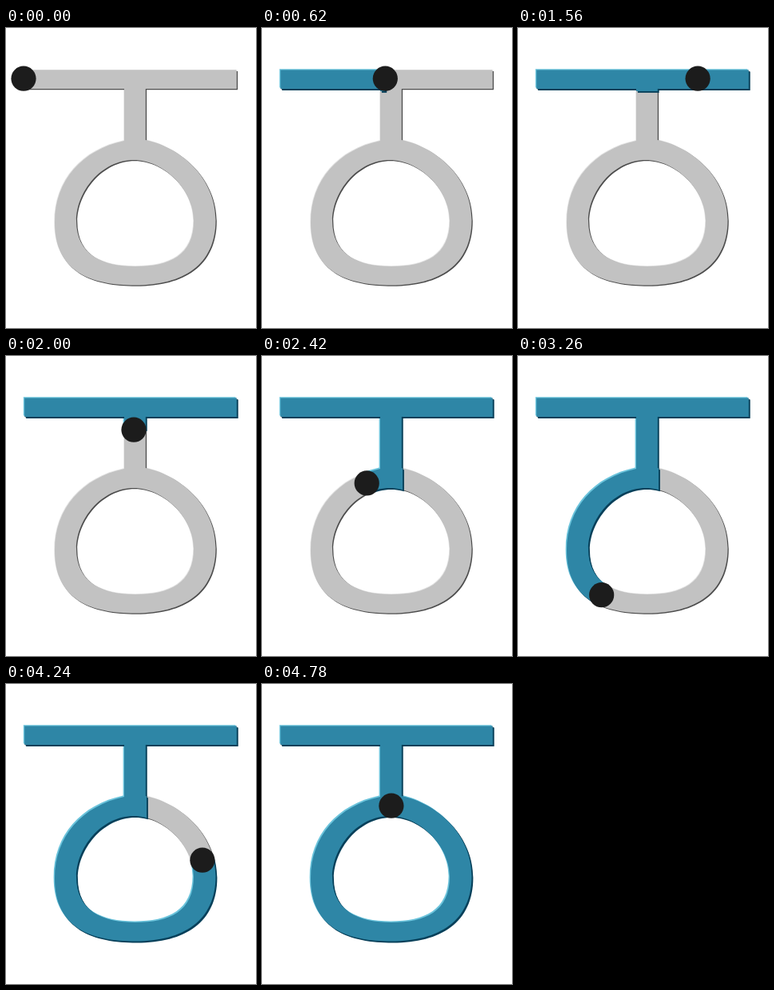
Write an HTML page that moves like this. It is 313 by 375 pixels and loops after 4.8 s.

```html
<!DOCTYPE html>
<html lang="en">
<head>
<meta charset="utf-8">
<title>Letter tracing</title>
<style>
  html, body { margin: 0; width: 100%; height: 100%; overflow: hidden; background: #fff; }
  svg { display: block; width: 100vw; height: 100vh; }
</style>
</head>
<body>
<svg viewBox="0 0 313 375">
  <defs>
    <path id="letter" fill-rule="evenodd" d="
      M23.2 52.6H288.8V76H174.8V140
      C222 150 262.5 190 262.5 240 C262.5 296 222 321.5 162 321.5
      C108 321.5 61 306 61 243 C61 190 96 152 148 141
      V76H23.2Z
      M160 165
      C119 165 88 205 88 241 C88 284 122 298 162 298
      C205 298 235 284 235 241 C235 203 198 165 160 165Z"/>
    <mask id="reveal" maskUnits="userSpaceOnUse" x="0" y="0" width="313" height="375">
      <g fill="#fff">
        <rect id="barMask" y="46" height="33"/>
        <rect id="stemMask" x="145" y="63" width="31"/>
      </g>
      <path id="ring" fill="none" stroke="#fff" stroke-width="34" d="
        M160 152
        C112 156 72 196 72 241 C72 290 108 310 162 310
        C215 310 249 290 249 241 C249 196 205 156 160 152"/>
    </mask>
    <g id="traced" mask="url(#reveal)"><use href="#letter"/></g>
  </defs>
  <g>
    <use href="#letter" x="-.7" y="-.7" fill="#e2e2e2"/>
    <use href="#letter" x="1.3" y="1.3" fill="#4c4c4c"/>
    <use href="#letter" fill="#c2c2c2"/>
  </g>
  <!-- The bevel follows the traced part, so its cut edges are shaded too -->
  <g>
    <use href="#traced" x="-1.4" y="-1.4" fill="#6cc4dc"/>
    <use href="#traced" x="1.9" y="1.9" fill="#07405a"/>
    <use href="#traced" fill="#2e86a6"/>
  </g>
  <circle id="dot" r="15.6" fill="#1c1c1c"/>
</svg>
<script>
const LOOP = 4800;
const LEFT = 21.8, RIGHT = 290, MID = 160, TOP = 63.2, JOIN = 152;
// Times at which the dot reaches the bar's end, the stem, the ring and the finish
const T_RIGHT = 1257, T_STEM = 1866, T_RING = 2280, T_END = 4790;

const el = id => document.getElementById(id);
const dot = el('dot'), bar = el('barMask'), stem = el('stemMask'), ring = el('ring');
const ringLength = ring.getTotalLength();

const part = (t, from, to) => Math.min(1, Math.max(0, (t - from) / (to - from)));
const mix = (a, b, k) => a + (b - a) * k;

function dotAt(t, travelled) {
  if (t < T_RIGHT) return { x: mix(LEFT, RIGHT, part(t, 0, T_RIGHT)), y: TOP };
  if (t < T_STEM) return { x: mix(RIGHT, MID, part(t, T_RIGHT, T_STEM)), y: TOP };
  if (t < T_RING) return { x: MID, y: mix(TOP, JOIN, part(t, T_STEM, T_RING)) };
  return ring.getPointAtLength(travelled);
}

function draw(t) {
  const travelled = ringLength * part(t, T_RING, T_END);
  const p = dotAt(t, travelled);
  dot.setAttribute('cx', p.x);
  dot.setAttribute('cy', p.y);

  bar.setAttribute('width', t < T_RIGHT ? p.x : 313);
  const bottom = t < T_STEM ? TOP : t < T_RING ? p.y : 168;
  stem.setAttribute('height', bottom - TOP);
  ring.style.visibility = travelled > 0 ? 'visible' : 'hidden';
  ring.setAttribute('stroke-dasharray', `${travelled} ${ringLength + 50}`);
}

const start = performance.now();
function tick() {
  draw((performance.now() - start) % LOOP);
  requestAnimationFrame(tick);
}
draw(0);
requestAnimationFrame(tick);
</script>
</body>
</html>
```
